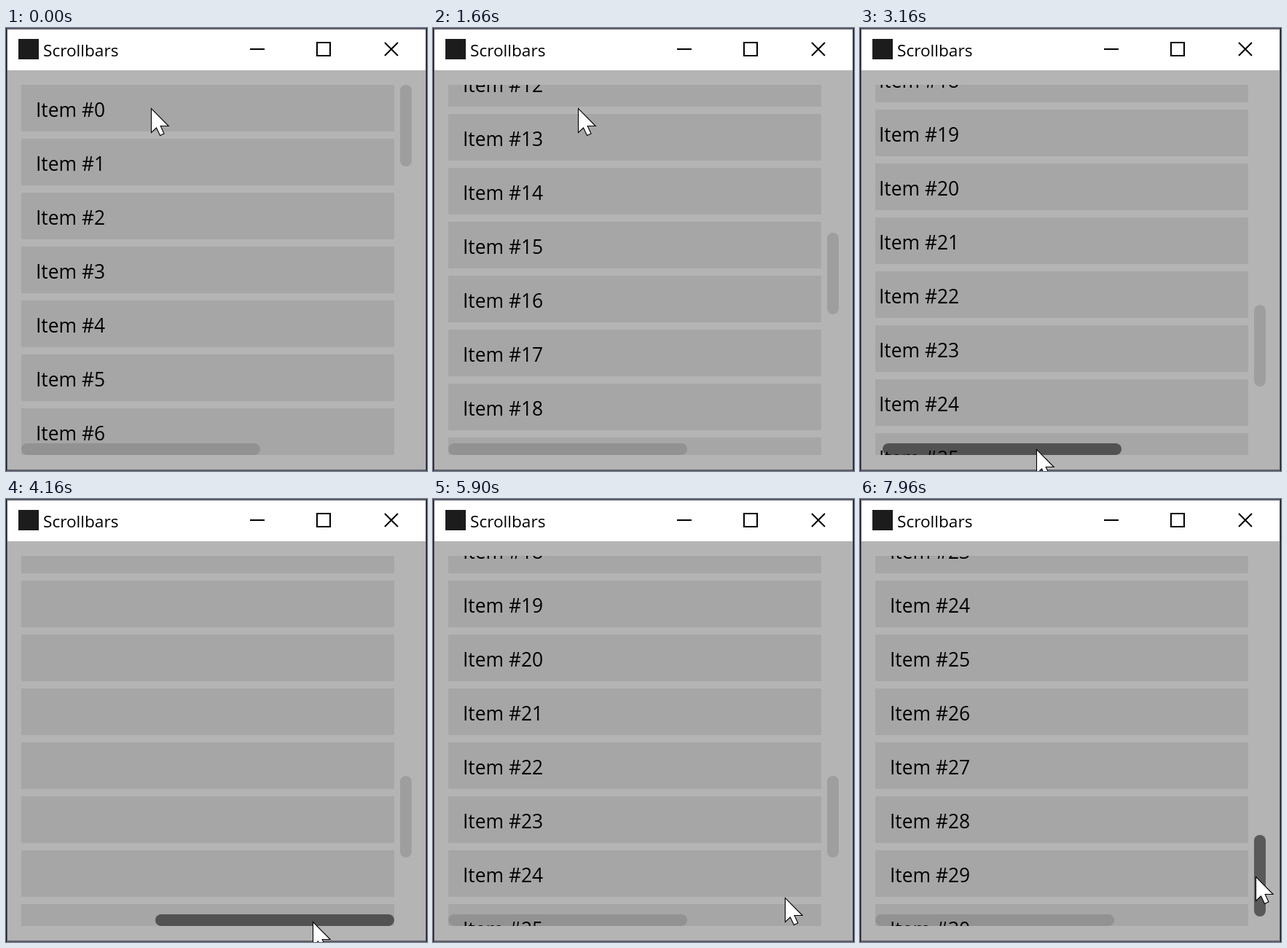
These frames come from a looping animation (578x608 px, 8000 ms). An HTML page:

```html
<!DOCTYPE html>
<html lang="en">
<head>
<meta charset="utf-8">
<title>Scrollbars</title>
<style>
  html, body { margin: 0; width: 100%; height: 100%; overflow: hidden; }
  svg { display: block; }
  text { font-family: "Open Sans", "Noto Sans", sans-serif; white-space: pre; }
</style>
</head>
<body>
<svg id="stage" width="578" height="608" viewBox="0 0 578 608">
  <defs>
    <clipPath id="viewport"><rect x="21" y="78" width="512" height="508"/></clipPath>
  </defs>

  <rect width="578" height="608" fill="#1b1926"/>
  <rect x="1" width="576" height="608" fill="#5f5d6a"/>
  <rect x="2" y="2" width="574" height="56" fill="#fff"/>
  <rect x="2" y="58" width="574" height="548" fill="#b4b4b4"/>

  <rect x="17" y="15" width="28" height="28" fill="#1c1c1c"/>
  <text x="51" y="39" font-size="22.6">Scrollbars</text>
  <g fill="none" stroke="#000" stroke-width="2">
    <path d="M335 29H355"/>
    <rect x="427" y="20" width="18" height="18"/>
    <path d="M520 20L538 38M538 20L520 38"/>
  </g>

  <g id="items" clip-path="url(#viewport)"></g>
  <rect id="vThumb" x="541" width="16" height="112" rx="8"/>
  <rect id="hThumb" y="570" width="328" height="16" rx="8"/>
  <path id="cursor" d="M.5 .5V33.5L7.5 27L12.5 37.5L18 35L13.2 24.5H24.2Z" fill="#fff" stroke="#000" stroke-width="1.1"/>
</svg>

<script>
const LOOP = 8000;
const PITCH = 74, LAST_ITEM = 30, POOL = 8;
const VIEW = { x: 21, y: 78, w: 512, h: 508 };
const CONTENT = { w: 800, h: 2309 };
const SCALE_X = CONTENT.w / VIEW.w, SCALE_Y = CONTENT.h / VIEW.h;
const WHEEL = 1372 / 3;
const HOVER_TIME = 300;

const progress = (t, from, to) => Math.min(1, Math.max(0, (t - from) / (to - from)));
const smooth = p => p * p * (3 - 2 * p);

// A pointer stroke; bend > 1 delays the vertical part
const stroke = (from, to, dx, dy, bend = 1) => t => {
  const p = progress(t, from, to);
  return { x: dx * p, y: dy * p ** bend };
};

const dragRight = stroke(3133, 3800, 194, 2);
const dragLeft = stroke(4150, 4967, -251, -16);
const dragDown = stroke(6667, 7400, 0, 122.7);
const dragUp = stroke(7733, 7967, -11, -86);

const strokes = [
  stroke(1870, 2467, 28, 422),        // down to the horizontal bar
  stroke(2467, 2733, 5, 46),          // onto its thumb
  dragRight,
  dragLeft,
  stroke(4967, 5033, -11, 0),
  stroke(5200, 6028, 377, -51, 6.5),  // across to the vertical bar
  stroke(6033, 6500, 13, -32),        // onto its thumb
  dragDown,
  dragUp
];

function pointerAt(t) {
  return strokes.reduce((p, move) => {
    const step = move(t);
    return { x: p.x + step.x, y: p.y + step.y };
  }, { x: 199, y: 110 });
}

function verticalScroll(t) {
  const spin = [683, 1183, 1650].reduce(
    (sum, start) => sum + smooth(progress(t, start, start + 230)), 0);
  const pulled = spin * WHEEL + dragDown(t).y * SCALE_Y;
  return Math.min(pulled, CONTENT.h - VIEW.h) + dragUp(t).y * 0.15 * SCALE_Y;
}

function thumbShift(t) {
  const room = VIEW.w - VIEW.w / SCALE_X;
  return Math.max(0, Math.min(dragRight(t).x, room + 10) + dragLeft(t).x);
}

const hover = (t, on, off) =>
  progress(t, on, on + HOVER_TIME) - progress(t, off, off + HOVER_TIME);
const thumbAlpha = h => 0.12 + 0.38 * h;

// Frames last a thirtieth of a second and start on 10 ms marks
const frameTime = t =>
  Math.floor((Math.floor(t / 10) * 10 + 9.99) * 3 / 100) * 100 / 3;

const byId = id => document.getElementById(id);
function set(node, attrs) {
  for (const name in attrs) node.setAttribute(name, attrs[name]);
}
function make(parent, tag, attrs) {
  const node = document.createElementNS("http://www.w3.org/2000/svg", tag);
  set(node, attrs);
  return parent.appendChild(node);
}

const vThumb = byId("vThumb"), hThumb = byId("hThumb"), cursor = byId("cursor");
const items = Array.from({ length: POOL }, () => {
  const row = make(byId("items"), "g", {});
  make(row, "rect", { x: VIEW.x, width: VIEW.w, height: 64, fill: "#a6a6a6" });
  const label = make(row, "text", { y: 44, "font-size": 26.4 });
  return { row, label };
});

function draw(time) {
  const t = frameTime(time);
  const pointer = pointerAt(t);
  const scrollY = Math.round(verticalScroll(t));
  const shift = Math.min(thumbShift(t), VIEW.w - VIEW.w / SCALE_X);
  const scrollX = Math.round(shift * SCALE_X);
  const first = Math.floor(scrollY / PITCH);

  items.forEach(({ row, label }, i) => {
    const index = first + i;
    set(row, {
      transform: `translate(0 ${VIEW.y + index * PITCH - scrollY})`,
      visibility: index > LAST_ITEM ? "hidden" : "visible"
    });
    label.setAttribute("x", VIEW.x + 20 - scrollX);
    label.textContent = "Item #" + index;
  });

  set(vThumb, {
    y: Math.round(VIEW.y + scrollY / SCALE_Y),
    "fill-opacity": thumbAlpha(hover(t, 6033, LOOP))
  });
  set(hThumb, {
    x: Math.round(VIEW.x + shift),
    "fill-opacity": thumbAlpha(hover(t, 2687, 5200))
  });
  cursor.setAttribute("transform",
    `translate(${Math.round(pointer.x)} ${Math.round(pointer.y)})`);
}

const start = performance.now();
function tick() {
  draw((performance.now() - start) % LOOP);
  requestAnimationFrame(tick);
}
tick();
</script>
</body>
</html>
```
